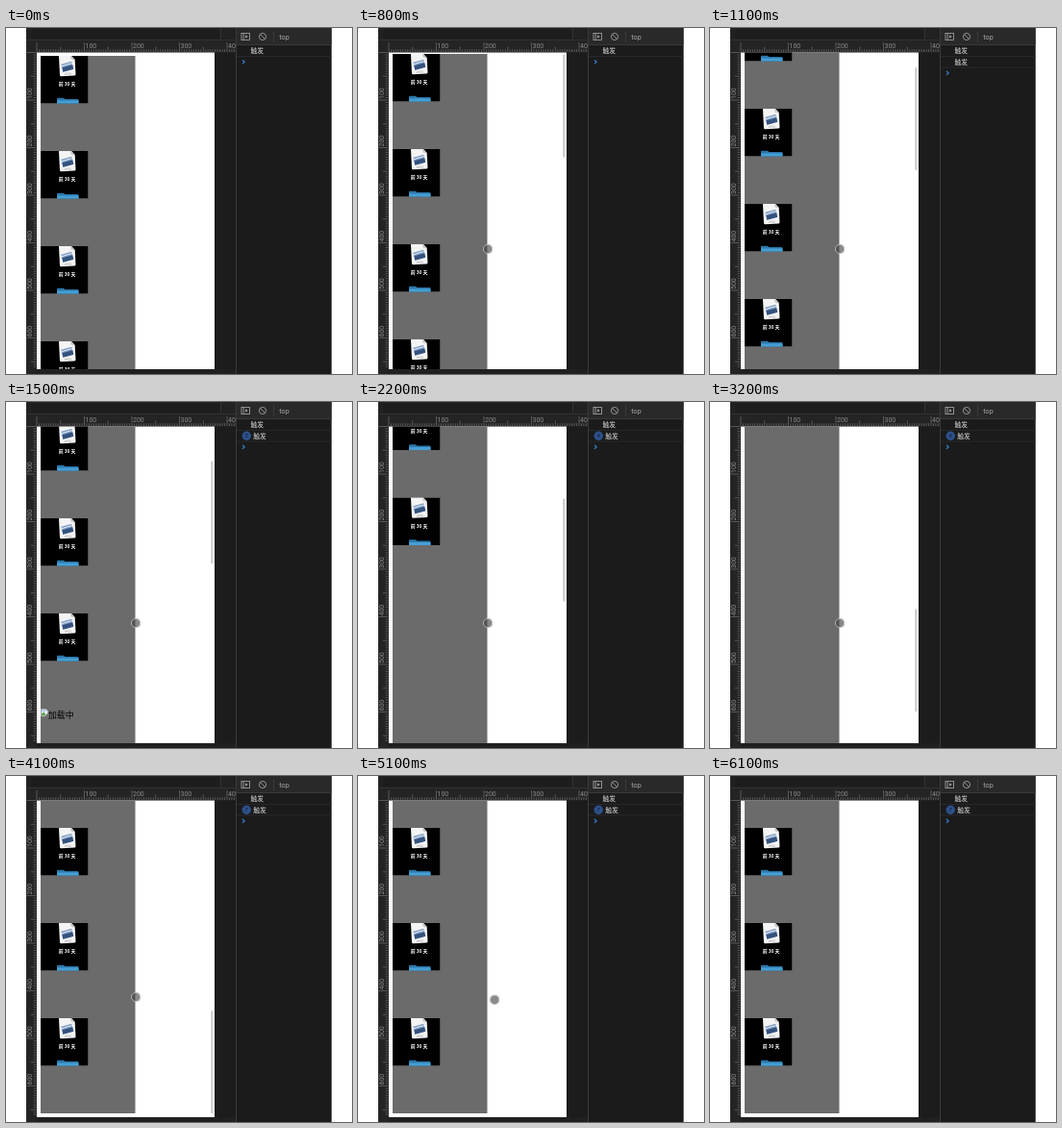
Animation, 360 px wide and 360 px high, one loop 6500 ms. Source, as an HTML page:

```html
<!DOCTYPE html>
<html lang="zh">
<head>
<meta charset="utf-8">
<title>Lazy loading</title>
<style>
  html, body { margin: 0; width: 100%; height: 100%; overflow: hidden; background: #fff; }
  svg { display: block; width: 100vw; height: 100vh; }
  text { font-family: "Noto Sans CJK SC", "Noto Sans CJK", "Noto Sans", sans-serif; }
  .ruler text { font: 7px Roboto, Arial, sans-serif; fill: #8d8d8d; }
  .log { font-size: 6.8px; fill: #dcdcdc; }
  .badge { font: 6px Roboto, sans-serif; fill: #0f1a2c; text-anchor: middle; }
  .top { font: 7.2px Roboto, Arial, sans-serif; fill: #a8a8a8; }
</style>
</head>
<body>
<svg viewBox="0 0 360 360" xmlns="http://www.w3.org/2000/svg">
  <defs>
    <clipPath id="phone"><rect x="32" y="25.5" width="185" height="329.5"/></clipPath>
    <clipPath id="square"><rect width="49.5" height="49.5"/></clipPath>
    <clipPath id="page"><rect x="21" width="317.5" height="360"/></clipPath>
    <clipPath id="side"><rect x="21" width="218" height="360"/></clipPath>

    <g id="photo" clip-path="url(#square)">
      <rect width="49.5" height="49.5" fill="#000"/>
      <g transform="rotate(-3 27.5 10)">
        <path d="M19.5 -1H31.5L36 4.5V19.5Q36 21 34.5 21H21Q19.5 21 19.5 19.5Z" fill="#f4f4f4"/>
        <path d="M31.5 -1L32 4L36 4.5Z" fill="#c9c9c9"/>
        <path d="M21.5 8.5L32.5 6L34 14L23 16.5Z" fill="#7e9cc4"/>
        <path d="M22.3 12L33.3 9.5L34 14L23 16.5Z" fill="#34527e"/>
        <path d="M22 10.5L29 8.5L32.8 8" stroke="#dbe6f2" fill="none"/>
        <text x="27.8" y="19.8" font-size="3" fill="#888" text-anchor="middle">JPEG</text>
      </g>
      <text x="27.6" y="31" font-size="4.9" font-weight="700" fill="#fff" text-anchor="middle">前 30 天</text>
      <path d="M17 50V44.6Q17 43.8 18 43.8H24L25.5 45H38.5Q39.5 45 39.5 46V50Z" fill="#2c78ad"/>
      <path d="M17 50V46.6H39.5V50Z" fill="#479fd3"/>
    </g>

    <g id="alt">
      <path d="M0.5 0.5H5.5L7.5 2.5V8H0.5Z" fill="#e8eef6" stroke="#a5a5a5" stroke-width=".6"/>
      <path d="M1 5.5L3.2 3.5L5.5 6L3.5 7.6H1Z" fill="#5ba34f"/>
      <path d="M1.2 1.2H5L6 3H1.2Z" fill="#a9c8ee"/>
      <path d="M7.8 4.5L4 8.3H7.8Z" fill="#6b6b6b"/>
      <text x="8" y="9.6" font-size="8.9" fill="#000">加载中</text>
    </g>
  </defs>

  <rect width="360" height="360" fill="#fff"/>
  <g clip-path="url(#page)">
    <rect x="21" width="318" height="360" fill="#1c1c1c"/>
    <rect x="21" width="218" height="12" fill="#222"/>
    <rect x="26" y="1" width="196" height="10" fill="#1d1d1d"/>
    <path d="M21 12.5H239M223.5 0V12" stroke="#303030"/>
    <rect x="21" y="13" width="218" height="12.5" fill="#242424"/>
    <rect x="21" y="25" width="11" height="335" fill="#242424"/>
    <rect x="32" y="355" width="207" height="5" fill="#202020"/>
    <g class="ruler" id="ruler" clip-path="url(#side)"></g>

    <g clip-path="url(#phone)">
      <rect x="32" y="25" width="186" height="331" fill="#fff"/>
      <g id="list">
        <rect x="36" y="29" width="98.5" height="990" fill="#6b6b6b"/>
      </g>
      <rect id="thumb" x="213.4" width="1.6" height="107" rx=".8" fill="#c2c2c2"/>
      <g id="pointer">
        <circle r="5.1" fill="#4a4a4a" fill-opacity=".65"/>
        <circle r="4.6" fill="none" stroke="#ddd" stroke-opacity=".75" stroke-width=".9"/>
      </g>
    </g>

    <rect x="239" width="100" height="360" fill="#1b1b1b"/>
    <rect x="239" width="100" height="17.5" fill="#292929"/>
    <path d="M239.5 0V360M239 17.5H339" stroke="#3a3a3a"/>
    <g fill="none" stroke="#9a9a9a" stroke-width=".9">
      <rect x="245" y="5.5" width="8.5" height="7"/>
      <path d="M247.2 5.5V12.5"/>
      <path d="M249 7.3V10.7L251.8 9Z" fill="#9a9a9a" stroke="none"/>
      <circle cx="267" cy="9" r="3.6"/>
      <path d="M264.5 6.5L269.5 11.5"/>
    </g>
    <path d="M278.5 3V15" stroke="#3c3c3c"/>
    <text class="top" x="284.3" y="11.7">top</text>

    <text class="log" x="254.5" y="26">触发</text>
    <path d="M240 29.5H339" stroke="#292d36" stroke-width=".8"/>
    <g id="repeat">
      <circle id="dot" cx="250.3" cy="35.2" r="4.7" fill="#2c518c"/>
      <text class="badge" id="count" x="250.3" y="37.4"></text>
      <text class="log" id="again" y="37.6">触发</text>
      <path d="M240 41H339" stroke="#292d36" stroke-width=".8"/>
    </g>
    <path id="prompt" d="M246 -2L248.2 0L246 2" fill="none" stroke="#3f86d8" stroke-width="1.1"/>
  </g>
</svg>
<script>
const LOOP = 6500, STEP = 100, SCALE = 0.495, ITEM = 99;
const $ = id => document.getElementById(id);

function add(parent, tag, attrs, text) {
  const el = document.createElementNS("http://www.w3.org/2000/svg", tag);
  for (const key in attrs) el.setAttribute(key, attrs[key]);
  if (text) el.textContent = text;
  parent.append(el);
  return el;
}

const show = (el, on) => el.setAttribute("visibility", on ? "visible" : "hidden");

// Linear interpolation over [time, value] pairs
function track(keys, t) {
  const i = keys.findIndex(k => k[0] > t);
  if (i < 0) return keys[keys.length - 1][1];
  if (i === 0) return keys[0][1];
  const [t0, a] = keys[i - 1], [t1, b] = keys[i];
  return a + (b - a) * (t - t0) / (t1 - t0);
}

function drawRuler() {
  const ruler = $("ruler");
  let d = "";
  for (let n = 0; n <= 660; n += 5) {
    const size = n % 100 === 0 ? 10 : n % 50 === 0 ? 5.5 : 2.8;
    const x = 32 + n * SCALE, y = 25.5 + n * SCALE;
    if (x < 239) d += `M${x} 25V${25 - size}`;
    d += `M31.5 ${y}H${31.5 - size}`;
    if (n && n % 100 === 0) {
      add(ruler, "text", { x: x + 1, y: 20.6 }, n);
      add(ruler, "text", { transform: `translate(27.3 ${y - 1}) rotate(-90)` }, n);
    }
  }
  add(ruler, "path", { d, stroke: "#858585", "stroke-width": .55 });
}

const scrollKeys = [[700, 0], [800, 2], [900, 9], [1000, 23], [1100, 44], [1200, 44],
  [1500, 106], [1900, 172], [2200, 226.5], [2500, 345], [2800, 461], [3000, 531],
  [3200, 579], [3400, 579], [3500, 602], [3600, 632], [3700, 656], [3800, 668]];
const pointerX = [[200, 176], [600, 135], [4600, 135], [5300, 145], [5500, 153], [5600, 173]];
const pointerY = [[200, 172], [600, 230], [4600, 230], [5300, 234], [5500, 216], [5600, 172]];
const thumbAlpha = [[700, 0], [800, 1], [4300, 1], [4600, 0]];
const logTimes = [1000, 1400, 1800, 2200, 2600, 3000, 3500];
const requestTimes = [0, 0, 0, 0, 1800, 2200, 2600, 3000, 3000, 3100];
const LOADED = 3600;

drawRuler();
const items = requestTimes.map((request, i) => {
  const y = 29 + i * ITEM;
  const use = href => add($("list"), "use", { href, x: 36, y });
  return { request, photo: use("#photo"), alt: use("#alt") };
});

function render(t) {
  const scroll = track(scrollKeys, t);
  $("list").setAttribute("transform", `translate(0 ${-scroll})`);
  $("thumb").setAttribute("y", 26.8 + scroll * 0.3255);
  $("thumb").setAttribute("opacity", track(thumbAlpha, t));

  for (const { request, photo, alt } of items) {
    show(photo, request === 0 || t >= LOADED);
    show(alt, t < request);
  }

  show($("pointer"), t >= 200 && t < 5700);
  $("pointer").setAttribute("transform", `translate(${track(pointerX, t)} ${track(pointerY, t)})`);

  const logs = logTimes.filter(time => time <= t).length;
  show($("repeat"), logs > 0);
  show($("dot"), logs > 1);
  $("count").textContent = logs > 1 ? logs : "";
  $("again").setAttribute("x", logs > 1 ? 257.3 : 254.5);
  $("prompt").setAttribute("transform", `translate(0 ${logs ? 46.8 : 35.3})`);
}

const start = performance.now();
function tick() {
  const t = (performance.now() - start) % LOOP;
  render(Math.floor(t / STEP) * STEP);
  requestAnimationFrame(tick);
}
tick();
</script>
</body>
</html>
```
